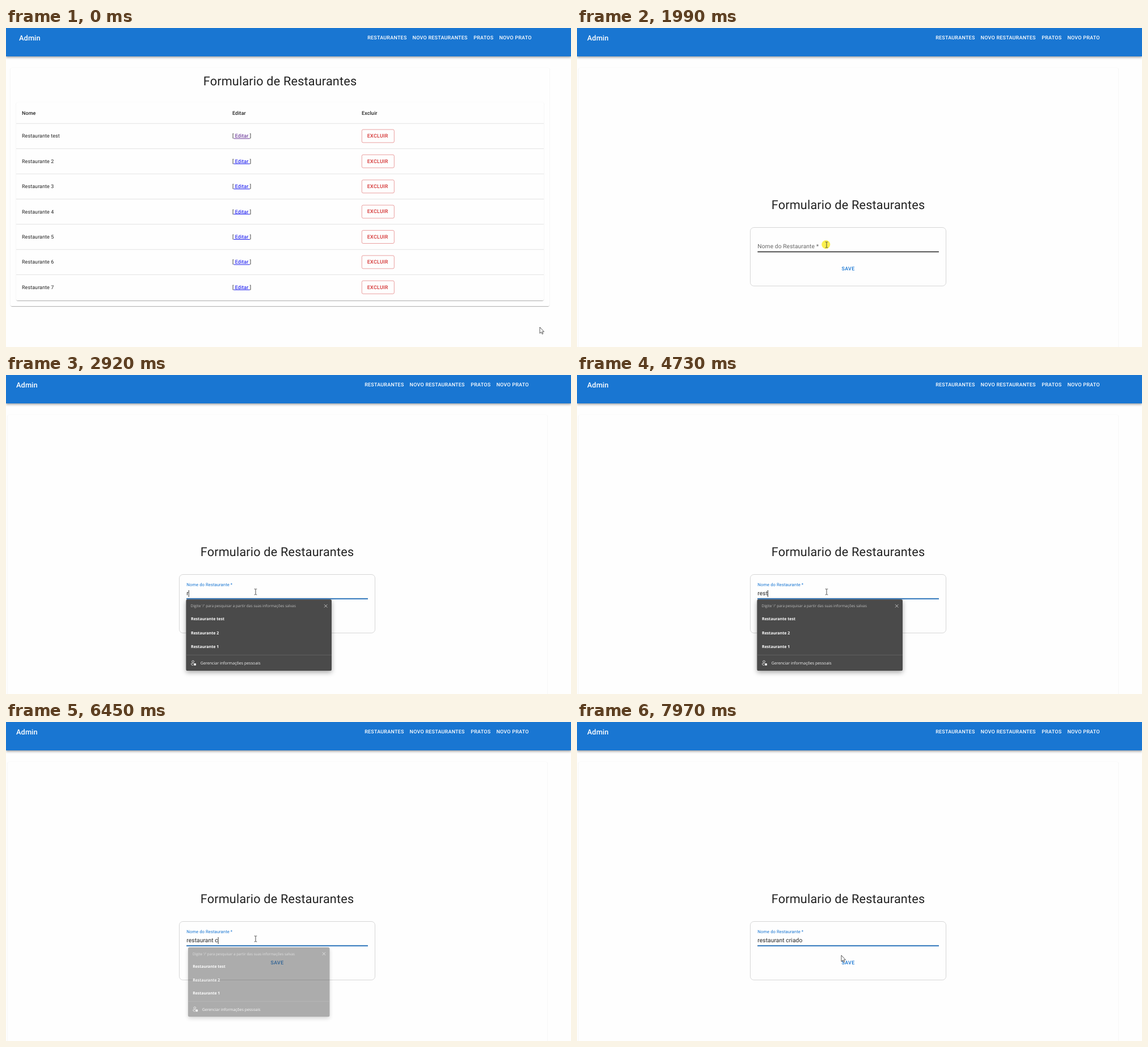
Recreate the animation shown at these times as an HTML page. Size 996x562 px, loop 8 s.

```html
<!DOCTYPE html>
<html lang="pt-BR">
<head>
<meta charset="utf-8">
<title>Admin</title>
<style>
  html, body { margin: 0; width: 100%; height: 100%; overflow: hidden; background: #fff; }
  #stage { position: relative; width: 996px; height: 562px; overflow: hidden; background: #fefefe; }
  .page, svg { position: absolute; left: 0; top: 0; width: 996px; height: 562px; }
  .page { overflow: hidden; }
  .paper {
    position: absolute; border-radius: 2.6px; background: #fefefe;
    box-shadow: 0 1.3px .64px -.64px rgba(0,0,0,.2), 0 .64px .64px rgba(0,0,0,.14), 0 .64px 1.9px rgba(0,0,0,.12);
  }
  #bar {
    position: absolute; left: 0; top: 0; width: 996px; height: 50px; background: #1976d2;
    box-shadow: 0 1.3px 2.6px -.64px rgba(0,0,0,.2), 0 2.6px 3.2px rgba(0,0,0,.14), 0 .64px 6.4px rgba(0,0,0,.12);
  }
  text { font: 400 8.95px Roboto, sans-serif; letter-spacing: .0107em; fill: rgba(0,0,0,.87); white-space: pre; text-rendering: geometricPrecision; }
  .h4 { font-size: 21.7px; letter-spacing: .00735em; text-anchor: middle; }
  .h6 { font-size: 12.78px; font-weight: 500; letter-spacing: .0075em; fill: #fff; }
  .head { font-weight: 500; }
  .btn { font-weight: 500; letter-spacing: .02857em; }
  .nav { fill: #fff; }
  .del { fill: #d32f2f; }
  .save { fill: #1976d2; text-anchor: middle; }
  .link { fill: #00e; text-decoration: underline; }
  .seen { fill: #551a8b; }
  .field { font-size: 10.22px; letter-spacing: .0094em; }
  #popup { filter: drop-shadow(0 3px 4px rgba(0,0,0,.35)); transform-origin: 445.7px 458px; }
  #popup text { font-family: "Open Sans", "Noto Sans", sans-serif; font-size: 7.1px; letter-spacing: 0; fill: #f4f4f4; }
  #popup .hint { font-size: 6.6px; fill: #bdbdbd; }
  #popup .item { font-size: 7.05px; font-weight: 700; fill: #fff; }
</style>
</head>
<body>
<div id="stage">
  <div class="page" id="list">
    <div class="paper" style="left:8px;top:70px;width:950px;height:420px"></div>
    <div class="paper" style="left:18px;top:131px;width:930px;height:348.6px"></div>
    <svg viewBox="0 0 996 562">
      <text class="h4" x="483" y="101">Formulario de Restaurantes</text>
      <text class="head" x="28" y="152.6">Nome</text>
      <text class="head" x="399" y="152.6">Editar</text>
      <text class="head" x="627" y="152.6">Excluir</text>
      <g id="rows"></g>
    </svg>
  </div>

  <div class="page" id="form">
    <div class="paper" style="left:3px;top:70px;width:950.6px;height:600px"></div>
    <svg viewBox="0 0 996 562">
      <text class="h4" x="478" y="319.3">Formulario de Restaurantes</text>
      <rect x="305.5" y="351.5" width="345" height="103" rx="6.4" fill="none" stroke="#d2d2d2" stroke-width=".9"/>
      <g id="label"><text class="field" id="labelText">Nome do Restaurante *</text></g>
      <rect id="rest" x="318.3" width="319.6"/>
      <rect id="focus" y="393.6" height="1.5" fill="#1976d2"/>
      <text class="btn save" x="478" y="427.2">SAVE</text>
      <circle id="click" cx="438.8" cy="381.5" r="7.5" fill="#fbf04e"/>
      <text class="field" id="value" x="318.3" y="388.3"></text>
      <rect id="caret" y="379" width=".9" height="12" fill="#222"/>
      <g id="popup">
        <rect x="317.4" y="395.2" width="256.6" height="125.8" rx="2.6" fill="#4a4a4a"/>
        <text class="hint" x="325.6" y="409.3">Digite '/' para pesquisar a partir das suas informações salvas</text>
        <path d="M561 404.2l5.4 5.4m0-5.4l-5.4 5.4" stroke="#ddd" stroke-width=".8"/>
        <text class="item" x="326" y="432.2">Restaurante test</text>
        <text class="item" x="326" y="456.5">Restaurante 2</text>
        <text class="item" x="326" y="480.7">Restaurante 1</text>
        <path d="M317.4 493.3h256.6" stroke="#6b6b6b" stroke-width=".7"/>
        <g fill="none" stroke="#eee" stroke-width=".8">
          <circle cx="329.6" cy="505" r="1.9"/>
          <path d="M330 511.4h-1.4q-2.2-.4-2.2-2.6 0-.6.8-.6h3"/>
        </g>
        <rect x="331" y="508" width="4" height="3.8" rx=".7" fill="#eee"/>
        <text x="342.8" y="510.2">Gerenciar informações pessoais</text>
      </g>
    </svg>
  </div>

  <div id="bar"></div>
  <svg viewBox="0 0 996 562">
    <clipPath id="navClip"><rect x="712" y="5.4" width="107" height="23.3" rx="2.6"/></clipPath>
    <circle id="ripple" cx="745" cy="18" fill="#fff" fill-opacity=".17" clip-path="url(#navClip)"/>
    <g id="nav">
      <text class="h6" x="23" y="21.6">Admin</text>
      <text class="btn nav" x="637.2" y="19.7">RESTAURANTES</text>
      <text class="btn nav" x="716.6" y="19.7">NOVO RESTAURANTES</text>
      <text class="btn nav" x="824.2" y="19.7">PRATOS</text>
      <text class="btn nav" x="869.4" y="19.7">NOVO PRATO</text>
    </g>
    <g id="cursor">
      <path id="arrow" d="M0 0V11L2.5 8.7 4.2 12.3 5.8 11.6 4.2 8.1H7.5Z" fill="#fff" stroke="#222" stroke-width=".75" stroke-linejoin="round"/>
      <path id="hand" d="M-1.1 1Q0-.6 1.1 1V5Q2-.0 3 5.3 4-.0 5 5.8 6.2 5 6.4 7V10Q6 11.5 5.2 12.6V14H-1V12.8L-3.8 8.8Q-4 7.2-2.4 7.8L-1.1 9Z" fill="#fff" stroke="#222" stroke-width=".7" stroke-linejoin="round"/>
      <path id="beam" d="M-2.3-5H-.6L0-4.4.6-5H2.3M0-4.4V4.4M-2.3 5H-.6L0 4.4.6 5H2.3" fill="none" stroke="#333" stroke-width=".85"/>
    </g>
  </svg>
</div>

<script>
const LOOP = 8000, TICK = 66.3, OPEN = 1190, FOCUS = 2000;
const WORD = 'restaurant criado';
// [time, letters shown]
const KEYS = [[2920, 1], [2990, 2], [3340, 3], [3530, 4], [3600, 5], [3680, 6], [4130, 5], [4200, 4],
  [5460, 5], [5590, 6], [5660, 7], [5730, 8], [5860, 9], [5920, 10], [6050, 11], [6390, 12], [6650, 13],
  [6980, 14], [7110, 15], [7180, 16], [7310, 17]];
const CARET_OFF = [[0, 2050], [2580, 2920], [4270, 4730], [5260, 5460], [7770, LOOP]];
// [time, x, y]
const PATH = [[30, 941, 527], [790, 721, 11], [860, 745, 16], [1190, 745, 16], [1740, 440, 382],
  [7720, 440, 382], [7960, 466, 411]];

const $ = id => document.getElementById(id);
const clamp = v => Math.min(1, Math.max(0, v));
const show = (id, on) => { $(id).style.display = on ? '' : 'none'; };
const set = (id, attrs) => { for (const k in attrs) $(id).setAttribute(k, attrs[k]); };

$('rows').innerHTML = Array.from({ length: 7 }, (_, i) => {
  const mid = 190.3 + i * 44.4, y = mid + 3.1;
  const line = i < 7 ? `<path d="M18 ${mid - 22.1}h930" stroke="#dfdfdf" stroke-width=".9"/>` : '';
  return `${line}<text x="28" y="${y}">Restaurante ${i ? i + 1 : 'test'}</text>
    <text x="399" y="${y}">[<tspan class="link ${i ? '' : 'seen'}"> Editar </tspan>]</text>
    <rect x="627.3" y="${mid - 11.4}" width="57" height="23" rx="2.4" fill="none" stroke="#d32f2f" stroke-opacity=".5" stroke-width=".9"/>
    <text class="btn del" x="636.8" y="${y - .2}">EXCLUIR</text>`;
}).join('');

function pointAt(t) {
  const i = PATH.findIndex(p => p[0] > t);
  if (i < 0) return PATH[PATH.length - 1].slice(1);
  if (!i) return PATH[0].slice(1);
  const [t0, x0, y0] = PATH[i - 1], [t1, x1, y1] = PATH[i];
  const u = (t - t0) / (t1 - t0), e = u * u * (3 - 2 * u);
  return [x0 + (x1 - x0) * e, y0 + (y1 - y0) * e];
}

function drawCursor(t, step) {
  const [x, y] = pointAt(step);
  const hand = t >= 780 && t < 1250;
  const beam = t > 1300 && y > 371 && y < 396;
  set('cursor', { transform: `translate(${x} ${y})` });
  show('hand', hand);
  show('beam', beam);
  show('arrow', !hand && !beam);
}

function drawField(t) {
  const e = 1 - (1 - clamp((t - FOCUS) / 200)) ** 3;
  const hover = t >= 1790;
  set('label', { transform: `translate(318.3 ${388.3 - 16.5 * e}) scale(${1 - .25 * e})` });
  $('labelText').style.fill = t >= FOCUS ? '#1976d2' : 'rgba(0,0,0,.6)';
  set('rest', hover
    ? { y: 393.6, height: 1.5, fill: '#212121' }
    : { y: 394.2, height: .8, fill: '#949494' });
  set('focus', { x: 478.1 - 159.8 * e, width: 319.6 * e });
  show('click', t >= 1920 && t < 2180);

  const typed = KEYS.filter(k => k[0] <= t).pop();
  const value = $('value');
  value.textContent = WORD.slice(0, typed ? typed[1] : 0);
  set('caret', { x: 318.2 + (typed ? value.getComputedTextLength() : 0) });
  show('caret', !CARET_OFF.some(([a, b]) => t >= a && t < b));
}

function drawPopup(t, step) {
  const out = clamp((step - 6365) / 120);
  show('popup', t >= 2920 && out < 1);
  $('popup').style.opacity = 1 - out;
  $('popup').style.transform = `scale(${1 - .05 * out})`;
}

function draw(t) {
  const step = Math.floor((t + 8) / TICK) * TICK;
  const opened = t >= OPEN;
  show('list', !opened);
  show('form', opened);
  set('nav', { transform: `translate(${opened ? -5 : 0} 0)` });
  show('ripple', t >= 930 && !opened);
  set('ripple', { r: Math.max(0, 15 + (step - 994) * .2) });
  if (opened) {
    drawField(t);
    drawPopup(t, step);
  }
  drawCursor(t, step);
}

const start = performance.now();
function loop() {
  draw((performance.now() - start) % LOOP);
  requestAnimationFrame(loop);
}
loop();
</script>
</body>
</html>
```
